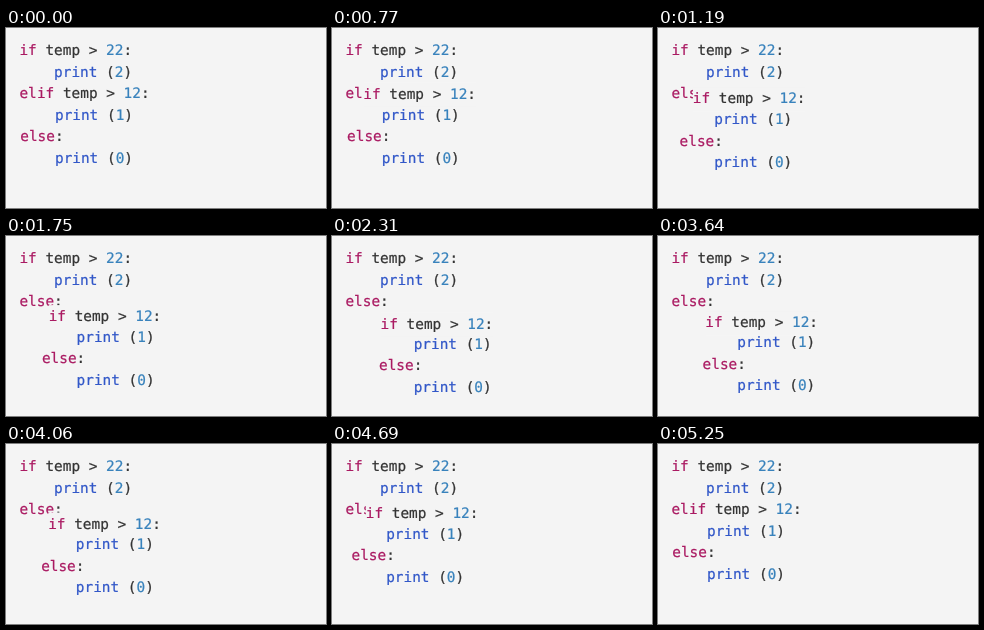
An HTML page for the animation above (5810 ms loop, 320x180 px).

```html
<!DOCTYPE html>
<html lang="en">
<head>
<meta charset="utf-8">
<title>elif as nested else / if</title>
<style>
  html, body { margin: 0; width: 100%; height: 100%; overflow: hidden; background: #f4f4f4; }
  svg { display: block; width: 100vw; height: 100vh; }
  text {
    font: 14.4px "DejaVu Sans Mono", monospace;
    text-rendering: geometricPrecision;
    white-space: pre;
  }
  tspan { color: #333; fill: currentColor; stroke: currentColor; stroke-width: 0.22px; }
  .kw { color: #aa1a62; }
  .fn { color: #3157c8; }
  .num { color: #3882bc; }
</style>
</head>
<body>
<svg viewBox="0 0 320 180">
  <g id="fixed"></g>
  <g id="test"><rect x="31" y="54" width="113" height="24" fill="#f4f4f4"/></g>
  <g id="rest"></g>
</svg>
<script>
const NS = "http://www.w3.org/2000/svg";
const LEFT = 13.4, COL = 8.67, TOP = 27, ROW = 21.5;
const LOOP = 5810, STEP = 70, OUT = 580, BACK = 3200, MOVE = 2000;
const byId = id => document.getElementById(id);
const fixed = byId("fixed"), test = byId("test"), rest = byId("rest");

const kindOf = word =>
  /^(if|else)$/.test(word) ? "kw" :
  word === "print" ? "fn" :
  /^\d+$/.test(word) ? "num" : "";

function line(group, row, col, code, dx = 0) {
  const text = document.createElementNS(NS, "text");
  text.setAttribute("x", LEFT + col * COL + dx);
  text.setAttribute("y", TOP + row * ROW);
  for (const word of code.match(/\w+|\W+/g)) {
    const span = document.createElementNS(NS, "tspan");
    span.textContent = word;
    span.setAttribute("class", kindOf(word));
    text.append(span);
  }
  group.append(text);
}

line(fixed, 0, 0, "if temp > 22:");
line(fixed, 1, 4, "print (2)");
line(fixed, 2, 0, "else:");
line(test, 2, 2, "if temp > 12:", 0.2);
line(rest, 3, 4, "print (1)", 0.9);
line(rest, 4, 0, "else:", 0.9);
line(rest, 5, 4, "print (0)", 0.9);

const ease = u => (1 - Math.cos(Math.PI * Math.min(1, Math.max(0, u)))) / 2;
const shift = (el, x, y) => el.setAttribute("transform", `translate(${x} ${y})`);

function draw(now) {
  const t = Math.floor((now % LOOP) / STEP) * STEP;
  const p = ease((t - OUT) / MOVE) - ease((t - BACK) / MOVE);
  shift(test, 18.5 * p, 23.9 * p);
  shift(rest, 34.2 * p, 22.4 * p);
}

const start = performance.now();
function tick() {
  draw(performance.now() - start);
  requestAnimationFrame(tick);
}
tick();
</script>
</body>
</html>
```
